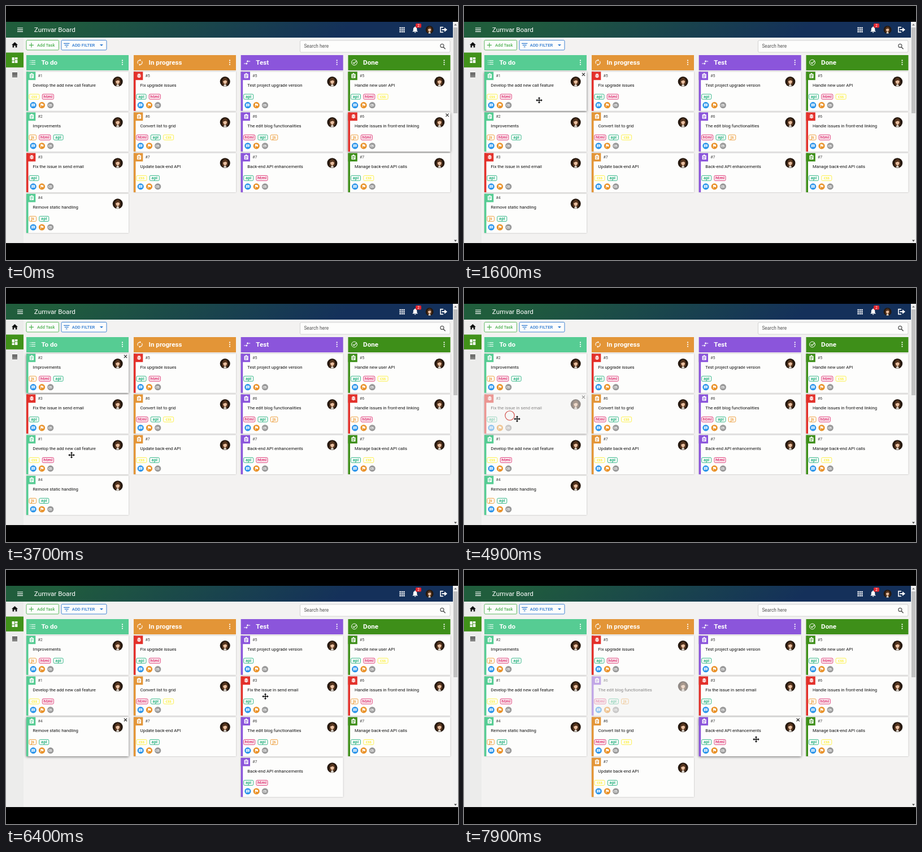
Recreate the animation shown at these times as an HTML page. Size 800x450 px, loop 8 s.

```html
<!DOCTYPE html>
<html lang="en">
<head>
<meta charset="utf-8">
<title>Task board</title>
<style>
html, body { margin: 0; width: 100%; height: 100%; overflow: hidden; background: #000; }
svg { display: block; width: 100%; height: 100%; font-family: Roboto, sans-serif; }
.card .paper { fill: #fdfdfc; filter: drop-shadow(0 .6px .8px rgba(0,0,0,.28)); }
.card .tint { fill: var(--c); }
.card .close { display: none; }
.card.hover .close { display: inline; }
.card.hover .paper { filter: drop-shadow(0 1px 2px rgba(0,0,0,.55)); }
.card.ghost { opacity: .47; }
.tag { font: 700 6.8px "Noto Sans", sans-serif; text-anchor: middle; }
</style>
</head>
<body>
<svg id="stage" viewBox="0 0 800 450"></svg>
<script>
const LOOP = 8000, RED = '#e3302a';
const TAGS = { api: ['#22b07d', 17], html: ['#dc2468', 20], js: ['#ec982f', 12.5], css: ['#fdf03a', 18] };
const COLUMNS = [
  { x: 36, name: 'To do', color: '#56cc93' },
  { x: 226, name: 'In progress', color: '#e39537' },
  { x: 415.7, name: 'Test', color: '#8b55db' },
  { x: 605.5, name: 'Done', color: '#3e8f19' }
];
const CARDS = [
  [1, 'Develop the add new call feature', 'css html'],
  [2, 'Improvements', 'js html api'],
  [3, 'Fix the issue in send email', 'api', true],
  [4, 'Remove static handling', 'js api'],
  [5, 'Fix upgrade issues', 'api html', true],
  [6, 'Convert list to grid', 'html api css'],
  [7, 'Update back-end API', 'css api'],
  [5, 'Test project upgrade version', 'api'],
  [6, 'The edit blog functionalities', 'html api js'],
  [7, 'Back-end API enhancements', 'api html'],
  [5, 'Handle new user API', 'api html css'],
  [6, 'Handle issues in front-end linking', 'js html', true],
  [7, 'Manage back-end API calls', 'api css']
];
// Card ids are hex digits, one word per column: time, layout, dragged, hovered ('*' = under the pointer)
const START = '0123 456 789 abc', MID = '1203 456 789 abc', LATE = '103 456 7289 abc';
const STEPS = [
  [0, START, '', 'b'], [250, START, '', '*'], [2300, START, '0', '0'],
  [2700, '1023 456 789 abc', '0', '0'], [3250, MID, '0', '0'],
  [3700, MID, '', '1'], [3900, MID, '', '*'], [4700, MID, '2', '2'],
  [5300, '1023 456 789 abc', '2', '2'], [5800, LATE, '2', '3'],
  [6400, LATE, '', '3'], [6600, LATE, '', '*'], [7200, LATE, '8', '8'],
  [7600, '103 4856 729 abc', '8', '9']
];
const POINTER = [
  [250, 690, 225], [1350, 138, 171], [1600, 133, 167], [2300, 120, 156], [3699, 120, 156],
  [3700, 116, 296], [3850, 116, 296], [4600, 94, 232], [6399, 94, 232],
  [6400, 459, 224], [7150, 517, 300], [8000, 517, 300]
];

const rect = (x, y, w, h, fill, extra = '') =>
  `<rect x="${x}" y="${y}" width="${w}" height="${h}" fill="${fill}" ${extra}/>`;
const circle = (x, y, r, fill, extra = '') => `<circle cx="${x}" cy="${y}" r="${r}" fill="${fill}" ${extra}/>`;
const text = (x, y, size, fill, str, extra = '') =>
  `<text x="${x}" y="${y}" font-size="${size}" fill="${fill}" ${extra}>${str}</text>`;
const line = (d, color, w = 1.2) => `<path d="${d}" fill="none" stroke="${color}" stroke-width="${w}"/>`;
const shape = (d, fill, extra = '') => `<path d="${d}" fill="${fill}" ${extra}/>`;
const at = (x, y, body, scale = 1) => `<g transform="translate(${x} ${y}) scale(${scale})">${body}</g>`;

const avatar = circle(0, 0, 9, '#25180f')
  + shape('M-5 5Q-6-6 0-7Q6-6 5 4L3 6H-3Z', '#5a3820')
  + shape('M-3.4-1Q0-4 3.4-1Q3.5 3 0 4.3Q-3.5 3-3.4-1Z', '#e9bfa0')
  + shape('M-3.5-1Q-2-4 1-4.5Q0-2-3.5-1Z', '#3d2414')
  + shape('M-3 7.9L-1 4.5H1L3 7.9Q0 9.4-3 7.9Z', '#dcd5cc');

const taskIcon = rect(-4, -3.8, 8, 8.4, '#fff', 'rx=".8"') + circle(0, -3.9, 1.4, '#fff')
  + `<path class="tint" d="M-2.4-2H2.4V-1H-2.4ZM-2.4 .1H2.4V1.1H-2.4ZM-2.4 2.2H1V3.2H-2.4Z"/>`;
const bugIcon = shape('M-2.2-1.8A2.2 2.2 0 0 1 2.2-1.8V1.8A2.2 2.2 0 0 1-2.2 1.8Z', '#fff')
  + line('M-4-1.8H4M-4 .2H4M-4 2.2H4M-2-4.6L-.7-3M2-4.6L.7-3', '#fff', .9)
  + line('M-1-.9H1M-1 1.2H1', RED, .8);

const meta = circle(12.2, 59.3, 5.6, '#2a94ea') + circle(27.5, 59.3, 5.6, '#e9922a') + circle(42.7, 59.3, 5.6, '#999')
  + shape('M9.2 56.7H15.2V61.1H10.4L9.2 62.3Z', '#fff') + line('M10.3 58.2H14.1M10.3 59.7H14.1', '#2a94ea', .6)
  + shape('M25.2 56.3H28L28.4 57H30.3V60.4H28L27.6 59.7H26V62.5H25.2Z', '#fff')
  + line('M45 57.9H40.6A1.5 1.5 0 0 0 40.6 60.9H44.7A1 1 0 0 0 44.7 59.1H41.3', '#fff', .8);

function cardMarkup([num, title, tags, bug]) {
  let x = 5;
  const chips = tags.split(' ').map(name => {
    const [color, w] = TAGS[name];
    const chip = rect(x, 39.8, w, 9, 'none', `rx="1.8" stroke="${color}" stroke-width=".9"`)
      + text(x + w / 2, 46.2, 6.8, color, name, 'class="tag"');
    x += w + 5.3;
    return chip;
  }).join('');
  return rect(0, 0, 181, 69.4, '', 'class="paper"') + rect(0, 0, 3.5, 69.4, '', 'class="tint"')
    + rect(0, 0, 16.3, 14.8, '', 'class="tint"') + at(9.5, 7.2, bug ? bugIcon : taskIcon, .9)
    + text(20.5, 9.6, 7, '#444', '#' + num) + text(11.6, 26.6, 7.72, '#111', title)
    + chips + meta + at(161.7, 17.6, avatar)
    + `<path class="close" d="M172.9 2.2l5.2 5.2m0-5.2l-5.2 5.2" stroke="#222" stroke-width="1.1"/>`;
}

const columnIcons = [
  line('M-2.5-3.2H5M-2.5 0H5M-2.5 3.2H5M-5-3.2H-3.7M-5 0H-3.7M-5 3.2H-3.7', '#fff', 1.1),
  line('M-3.4 2.3A4 4 0 0 1 0-4M3.4-2.3A4 4 0 0 1 0 4', '#fff', 1.1)
    + shape('M-.2-6.1V-1.9L2-4ZM.2 6.1V1.9L-2 4Z', '#fff'),
  line('M-5.5 2H-.5M5.5-2H.5', '#fff', 1.1) + shape('M-1.5-.3V4.3L1 2ZM1.5-4.3V.3L-1-2Z', '#fff'),
  circle(0, 0, 4.9, 'none', 'stroke="#fff"') + line('M-2.5 0L-.7 1.9L4.3-3.2', '#fff', 1.1)
];

function columnHead({ x, name, color }, i) {
  return rect(x, 87, 181, 27, color) + at(x + 11, 100, columnIcons[i])
    + text(x + 26.6, 104.2, 11.6, '#fff', name, 'font-weight="700"')
    + [96.4, 100, 103.6].map(y => circle(x + 170, y, 1.1, '#fff')).join('');
}

function topBar() {
  let dots = '';
  for (let i = 0; i < 9; i++) dots += rect(696.5 + i % 3 * 3.4, 37.6 + (i / 3 | 0) * 3.4, 2.4, 2.4, '#fff');
  return rect(0, 28, 791, 28, 'url(#bar)')
    + line('M20 39H30M20 42.2H30M20 45.4H30', '#fff', 1.2)
    + text(49.8, 46.3, 11.7, '#fff', 'Zumvar Board') + dots
    + shape('M719.5 45.6V45L720.8 43.7V40.8Q720.8 38 723.3 37.5V36.5H725V37.5Q727.4 38 727.4 40.8V43.7L728.8 45V45.6ZM722.8 46.2H725.5Q725.3 47.5 724.1 47.5T722.8 46.2Z', '#fff')
    + rect(725, 31, 10, 7.6, '#e2262f', 'rx="1.8"')
    + text(730, 37.1, 6.5, '#fff', '2', 'text-anchor="middle"')
    + at(749.6, 42, avatar, .78)
    + line('M774 37.6H769V46.4H774', '#fff', 1.6)
    + shape('M771.5 40.9H776V38L781 42L776 46V43.1H771.5Z', '#fff');
}

function sideBar() {
  return rect(0, 56, 31, 364, '#ececeb') + rect(0, 82.5, 31, 26.3, '#41921a')
    + shape('M15.5 64L21 69H19.4V73.6H16.8V70.2H14.2V73.6H11.6V69H10Z', '#111')
    + shape('M10.6 91H15V96.5H10.6ZM16 91H20.4V94.4H16ZM10.6 97.5H15V101H10.6ZM16 95.4H20.4V101H16Z', '#fff')
    + line('M11 118.6H20M11 120.9H20M11 123.2H20M11 125.5H20', '#111', 1.2);
}

function toolBar() {
  const green = '#4bb04f', blue = '#2b78d0', bold = 'font-weight="500"';
  return rect(36, 60.6, 57.5, 17.4, '#fdfdfc', `rx="1.8" stroke="${green}" stroke-width=".9"`)
    + line('M40.8 69.3H49M44.9 65.2V73.4', green) + text(55, 72.1, 7.65, green, 'Add Task', bold)
    + rect(98, 60.6, 80, 17.4, '#fdfdfc', `rx="1.8" stroke="${blue}" stroke-width=".9"`)
    + line('M102 66.3H112.4M103.7 69.3H110.7M105.8 72.3H108.6', blue)
    + text(116.8, 72.1, 7.65, blue, 'ADD FILTER', bold) + shape('M166 68H172L169 71Z', blue)
    + rect(520.5, 61, 265.5, 21, '#fdfdfc', 'rx="2" stroke="#c8c8c8" stroke-width=".8"')
    + text(527.4, 74.2, 8.3, '#555', 'Search here')
    + circle(771.9, 70.4, 3, 'none', 'stroke="#555" stroke-width="1.2"') + line('M774 72.6L777.6 76.2', '#555', 1.5);
}

const scrollBar = rect(791, 28, 9, 392, '#f1f1f1') + rect(792, 38, 7, 152, '#c1c1c1')
  + shape('M793 34.5H798L795.5 31.5Z', '#777') + shape('M793 414.5H798L795.5 417.5Z', '#444');

const moveArrow = 'M0-5.8L2.3-3.2H.7V-.7H3.2V-2.3L5.8 0L3.2 2.3V.7H.7V3.2H2.3L0 5.8L-2.3 3.2H-.7V.7H-3.2V2.3L-5.8 0L-3.2-2.3V-.7H-.7V-3.2H-2.3Z';

const stage = document.getElementById('stage');
stage.innerHTML = `<defs><linearGradient id="bar" gradientUnits="userSpaceOnUse" x1="258.7" y1="-153" x2="532.3" y2="237">
  <stop offset=".11" stop-color="#205d3c"/><stop offset=".75" stop-color="#14305a"/></linearGradient></defs>`
  + rect(0, 28, 800, 392, '#f3f2f1') + sideBar() + topBar() + scrollBar + toolBar()
  + COLUMNS.map(columnHead).join('')
  + CARDS.map(c => `<g class="card">${cardMarkup(c)}</g>`).join('')
  + circle(81, 226, 8.2, 'none', 'id="ring" stroke="#d0453f" stroke-width="1.1"')
  + `<g id="pointer">${shape(moveArrow, '#111', 'stroke="#fff" stroke-width="1.4" paint-order="stroke"')}</g>`;

const cards = [...stage.querySelectorAll('.card')];
const pointer = document.getElementById('pointer');
const ring = document.getElementById('ring');

function pointerAt(t) {
  const i = POINTER.findIndex(k => k[0] > t);
  if (i < 1) return null;
  const [t0, x0, y0] = POINTER[i - 1], [t1, x1, y1] = POINTER[i];
  const p = (t - t0) / (t1 - t0), e = p * p * (3 - 2 * p);
  return [x0 + (x1 - x0) * e, y0 + (y1 - y0) * e];
}

function draw(t) {
  const [, layout, ghost, hover] = STEPS.findLast(s => s[0] <= t);
  const pos = pointerAt(t);
  pointer.style.display = pos ? '' : 'none';
  if (pos) pointer.setAttribute('transform', `translate(${pos})`);
  ring.style.display = t >= 4700 && t < 5100 ? '' : 'none';

  layout.split(' ').forEach((ids, col) => [...ids].forEach((id, row) => {
    const n = parseInt(id, 16), el = cards[n];
    const x = COLUMNS[col].x, y = 116.4 + row * 72.1;
    const under = pos && pos[0] > x && pos[0] < x + 181 && pos[1] > y && pos[1] < y + 69.4;
    const home = id === ghost ? START.split(' ').findIndex(s => s.includes(id)) : col;
    el.setAttribute('transform', `translate(${x} ${y})`);
    el.style.setProperty('--c', CARDS[n][3] ? RED : COLUMNS[home].color);
    el.classList.toggle('ghost', id === ghost);
    el.classList.toggle('hover', hover === '*' ? !!under : id === hover);
  }));
}

function frame() {
  draw(performance.now() % LOOP);
  requestAnimationFrame(frame);
}
frame();
</script>
</body>
</html>
```
